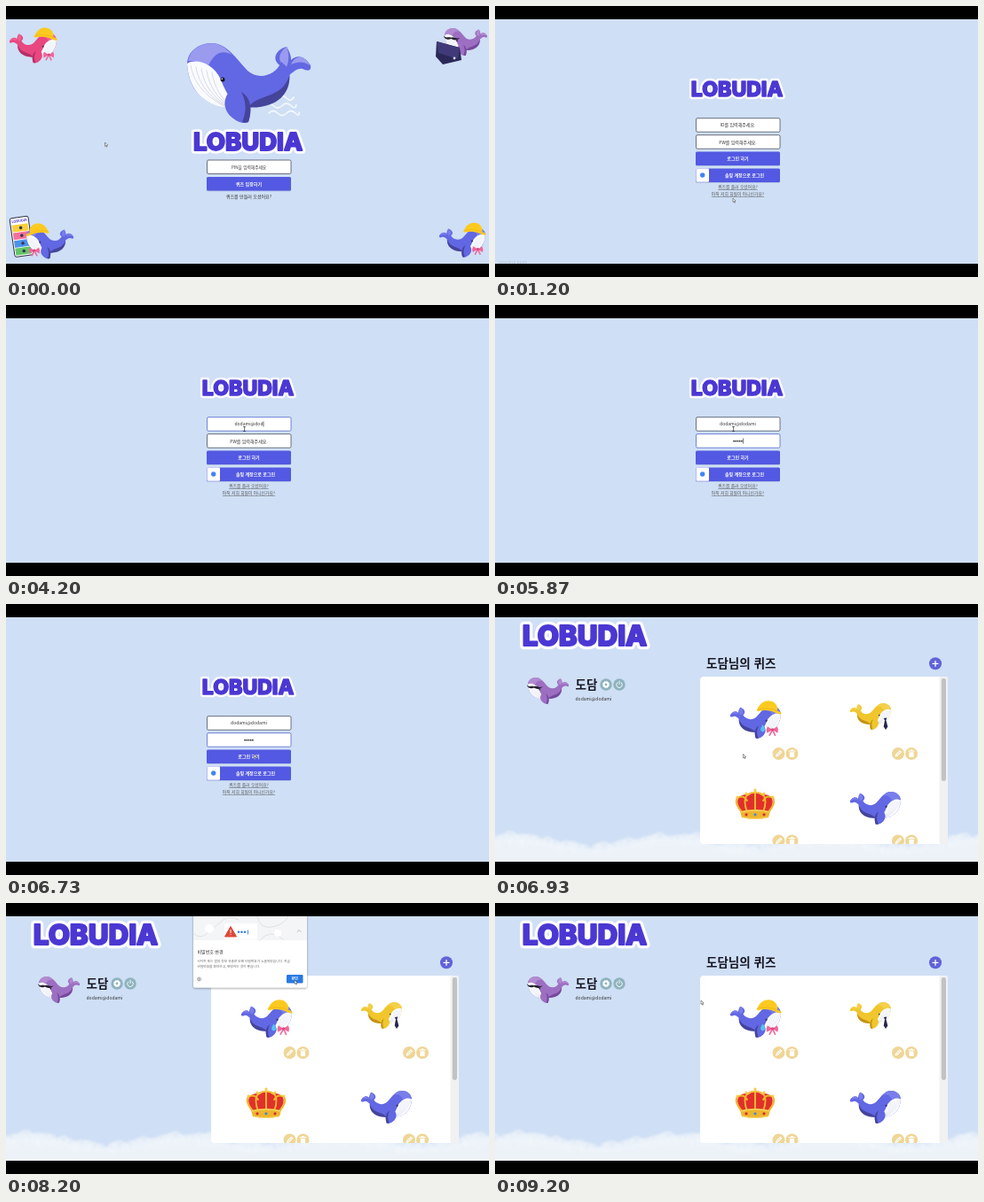
An HTML page that plays this animation: 544 by 306 pixels, repeating every 9270 ms.

```html
<!DOCTYPE html>
<html lang="ko">
<head>
<meta charset="utf-8">
<style>
html, body { margin: 0; width: 100%; height: 100%; overflow: hidden; background: #000; }
svg { display: block; width: 100vw; height: 100vh; }
text { font-family: "Noto Sans CJK KR", "Noto Sans CJK", sans-serif; font-size: 5px; fill: #333; }
.mid { text-anchor: middle; }
.logo { font: 800 27.5px Inter, sans-serif; text-anchor: middle; stroke-linejoin: round; }
.white { fill: #fff; font-weight: 900; }
.head { font-size: 13.5px; font-weight: 900; fill: #161622; }
.link { fill: #555; text-decoration: underline; }
</style>
</head>
<body>
<svg id="stage" viewBox="0 0 544 306"></svg>
<script>
const LOOP = 9270;
const NAME = '도담', ACCOUNT = 'dodami@dodami';
// Body, underside, highlight
const LARGE = ['#6267e3', '#44449b', '#9a9bef'];
const BLUE = ['#6267e3', '#44449b', '#7a7eea'];
const PINK = ['#e8477f', '#b62f68', '#ee628f'];
const PURPLE = ['#9d6fc2', '#75489c', '#b18bd0'];
const YELLOW = ['#f0c62c', '#c59316', '#f4d04c'];

const text = (x, y, s, cls = 'mid', more = '') => `<text x="${x}" y="${y}" class="${cls}" ${more}>${s}</text>`;
const rect = (x, y, w, h, fill, more = '') => `<rect x="${x}" y="${y}" width="${w}" height="${h}" fill="${fill}" ${more}/>`;
const circle = (x, y, r, fill, more = '') => `<circle cx="${x}" cy="${y}" r="${r}" fill="${fill}" ${more}/>`;
const path = (d, fill, more = '') => `<path d="${d}" fill="${fill}" ${more}/>`;
const line = (d, color, width = 1) => path(d, 'none', `stroke="${color}" stroke-width="${width}" stroke-linecap="round" stroke-linejoin="round"`);
const group = (s, more) => `<g ${more}>${s}</g>`;

const logo = (x, y, k) => group(
  [['#fff', 7.5], ['#4b38d3', 1.8]].map(([c, w]) => `<text class="logo" y="10" stroke="${c}" stroke-width="${w}" style="fill:${c}">LOBUDIA</text>`).join(''),
  `transform="translate(${x} ${y}) scale(${k})"`);

const field = (id, y) => rect(226.5, y, 94.5, 15.5, '#fff', `id="${id}" rx="1.5" stroke="#343a48" stroke-width=".7"`);
const button = (y, label, x = 273.5) => rect(226, y + .6, 95, 15.6, '#8d9bd0', 'rx="1.5" opacity=".6"') +
  rect(226, y, 95, 15.4, '#5359e2', 'rx="1.5"') + text(x, y + 9.6, label, 'mid white');

// Accessories share the whale's own 139 x 91 space, facing left.
const HAT = path('M10 14C4-16 50-28 64 8Q70 14 62 15Q36 8 12 20Q0 26-2 21Q1 15 10 14Z', '#fcca1f') +
  line('M10 14Q34 3 63 9', '#eeb51a', 2);
const BOW = path('M23 66L10 57Q5 66 9 75ZL37 57Q42 66 38 75Z', '#f0669a') + circle(23, 66, 4.5, '#d8487f') +
  line('M21 70L16 81M25 70L31 81', '#f0669a', 4);
const TEAR = path('M50 52Q38 68 49 72Q62 70 50 52', '#54c4ef');
const TASHE = path('M-3 24C3 35 13 27 21 31C29 25 38 38 50 31C42 42 29 40 21 35C12 40-2 36-3 24', '#24202c');
const TIE = path('M14 50L25 51L21 58L25 80L18 91L11 80L17 58Z', '#26274f');

function whale(x, y, w, [body, dark, light], flip, extra = '') {
  const k = w / 139;
  const ribs = [0, 1, 2, 3, 4].map(i =>
    line(`M${4 + i * 6} ${25 + i * 2}C${7 + i * 6} ${44 + i * 2} ${20 + i * 5} ${60 + i} ${42 + i * 2} 71`, '#d3d6e0', .9)).join('');
  const shape =
    path('M106 26C95 20 98 8 112 4C117 12 119 20 115 30Z', body) +
    path('M108 25C101 18 104 10 112 4C115 12 115 19 112 27Z', light) +
    path('M112 29C116 13 130 10 139 25C140 31 137 32 130 29C123 28 120 33 115 36Z', body) +
    path('M117 24C122 13 132 13 138 25C131 20 124 21 117 24Z', light) +
    path('M0 23C1 8 14 0 28 0C44 0 54 16 68 31C80 42 100 37 106 21L115 29C119 52 104 68 74 72C36 78 2 66 0 23Z', body) +
    path('M70 71C82 57 107 62 115 37C117 56 101 74 70 72.5Z', dark) +
    path('M1 20C4 5 18-1 30 .3C40 2 46 8 50 13C41 8 32 9 24 25C16 21 8 20 1 20Z', light) +
    path('M0 23C10 17 29 22 38 41C43 55 50 66 60 73C31 76 2 62 0 23Z', '#fafbff') + ribs +
    path('M47 55C39 66 42 78 52 85C58 90 65 91 69 89C73 77 73 62 61 55Z', body) +
    path('M61 55C73 62 73 77 69 89C66 90 64 90 62 89C67 78 67 66 61 55Z', dark) +
    circle(40, 41, 2.5, '#16162c') + circle(39.3, 40.2, .8, '#fff');
  return group(shape + extra, `transform="translate(${flip ? x + w : x} ${y}) scale(${flip ? -k : k} ${k})"`);
}

const bob = s => group(s, 'class="bob"');

function home() {
  const phone = rect(0, 0, 21, 44, '#fff', 'rx="2" stroke="#25253b" stroke-width=".9"') +
    text(10.5, 5.5, 'LOBUDIA', 'mid', 'style="font-size:4px;font-weight:900;fill:#4b38d3"') +
    ['#f8cf3e', '#f2719b', '#4d91ec', '#64c568'].map((c, i) =>
      rect(1.5, 8 + i * 8.8, 18, 8, c) + circle(11, 12 + i * 8.8, 1.8, '#333a52')).join('');
  const laptop = path('M485 40L511 47L513 61L492 66L484 57Z', '#2b2857') +
    path('M485 40L511 47L509 60L487 53Z', '#403b78') + circle(505, 59, 1.4, '#d9d9ef');
  const waves = [0, 1, 2].map(i => line(`M${286 + i * 5} ${104 + i * 8.5}q5-5 10 0t10 0t10 0t${8 - i * 2}-1`, '#f4f8ff', 1.7)).join('');
  return bob(waves + whale(204, 42, 139, LARGE)) +
    bob(whale(4, 30, 53, PINK, true, HAT + BOW)) +
    bob(whale(494, 25, 48, PURPLE, false, TASHE) + laptop) +
    bob(group(phone, 'transform="translate(4 240) rotate(-8)"') + whale(23, 251, 53, BLUE, false, HAT + BOW)) +
    bob(whale(488, 250, 52, BLUE, true, HAT + BOW)) +
    logo(272.5, 153, 1) + field('pin', 174) + text(273.5, 183.7, 'PIN을 입력해주세요', 'mid', 'style="font-size:4.7px"') +
    button(193, '퀴즈 입장하기') + text(273.5, 216.5, '퀴즈를 만들러 오셨어요?');
}

function login() {
  return logo(272.5, 94, .84) + field('idBox', 126.7) + field('pwBox', 145.7) +
    text(273.5, 136.4, '', 'mid', 'id="idText"') + text(273.5, 155.6, '', 'mid', 'id="pwText"') +
    '<g id="dots"></g>' + rect(0, 0, .6, 6, '#222', 'id="caret"') +
    button(164.6, '로그인 하기') + button(183.5, '솔빛 계정으로 로그인', 281) +
    rect(226.4, 183.6, 14.6, 15.2, '#fff', 'rx="1"') + circle(233.7, 191, 2.7, '#4285f4') +
    text(273.5, 206, '퀴즈를 풀러 오셨어요?', 'mid link', 'style="font-size:4.8px"') +
    text(273.5, 214, '아직 저희 회원이 아니신가요?', 'mid link', 'style="font-size:4.8px"') +
    text(4, 291, 'opening page', '', 'id="status"');
}

function clouds() {
  let seed = 7, puffs = '';
  const rnd = () => (seed = seed * 16807 % 2147483647) / 2147483647;
  for (let x = -60; x < 570; x += 7) {
    const y = 269 - 6 * Math.cos((x - 20) / 87.5 * Math.PI);
    puffs += circle(x, y + rnd() * 6, 5 + rnd() * 6, '#f3f7fc', 'opacity=".5"') +
      circle(x + 3, y + 13, 11, '#edf2f8', 'opacity=".7"');
  }
  return group(puffs + rect(-60, 283, 640, 10, '#edf2f8'), 'id="clouds" filter="url(#soft)"');
}

function tools(x, y) {
  return circle(x, y, 7, '#efd697') + line(`M${x - 2.8} ${y + 2.8}l.7-2l4-4l1.4 1.4l-4 4Z`, '#fff', 1.2) +
    circle(x + 15, y, 7, '#efd697') + rect(x + 12.4, y - 1.8, 5.2, 5.8, '#fff', 'rx=".6"') +
    line(`M${x + 11.6} ${y - 3}h6.8m-4.4-1h2`, '#fff', 1.1);
}

function crown() {
  return path('M277 235C270 222 273 216 283 215Q293 209 303 215C313 216 316 222 309 235Z', '#e12f2c') +
    line('M278 235Q269 224 273 219Q280 215 284 222M284 235Q279 222 284 215M293 235V212M302 235Q307 222 302 215M308 235Q317 224 313 219Q306 215 302 222', '#efb62d', 2) +
    line('M284 216Q293 209 302 216', '#f6c844', 1.8) +
    path('M276 234Q293 230 310 234L308 241Q293 245 278 241Z', '#eeb52d') +
    line('M277 235Q293 231 309 235M279 241Q293 244 307 241', '#f9dc75', 1) +
    [283, 293, 303].map((x, i) => circle(x, 237.8, 1.6, i === 1 ? '#4a87d8' : '#d32d38')).join('') +
    [273, 283, 293, 303, 313].map(x => circle(x, 210 + Math.abs(x - 293) * .4, 1.6, '#f7cd4c')).join('');
}

function dialog() {
  return rect(211, 10, 128, 85.5, '#fff', 'rx="2" filter="url(#shade)"') + rect(211, 14, 128, 28, '#f4f5f7') +
    line('M211 34Q218 42 227 34T240 23Q250 12 262 19M283 15Q286 30 300 27T318 15M286 42Q298 28 312 41', '#dcdfe3', .9) +
    circle(229, 29, 5, '#fff') + circle(306, 34, 4, '#fff') +
    rect(246, 23, 37, 18.5, '#fff', 'rx="2"') +
    path('M253 26.5L259.5 38H246.5Z', '#df4738', 'stroke="#df4738" stroke-linejoin="round"') +
    rect(252.5, 30, 1, 4, '#fff') + rect(252.5, 35.2, 1, 1, '#fff') +
    [262, 265.5, 269].map(x => circle(x, 32.8, 1.3, '#397fe2')).join('') + rect(272, 30.5, .9, 5, '#397fe2') +
    line('M328 32.5l2-2l2 2', '#9aa0a6', .7) +
    text(215.5, 57, '비밀번호 변경', '', 'style="font-size:5px"') +
    text(215.5, 66.5, '사이트 또는 앱의 정보 유출로 인해 비밀번호가 노출되었습니다. 지금', '', 'style="font-size:3.7px;fill:#666"') +
    text(215.5, 73, '비밀번호를 확인하고, 변경하는 것이 좋습니다.', '', 'style="font-size:3.7px;fill:#666"') +
    circle(217.5, 86, 1.9, 'none', 'stroke="#555" stroke-width=".6"') + rect(217.2, 85, .6, 2, '#555') +
    rect(316, 81, 18.5, 9.5, '#2878e5', 'rx="1.3"') + text(325.2, 87.4, '확인', 'mid white', 'style="font-size:4px"');
}

function board() {
  const cards = whale(265, 115, 57, BLUE, true, HAT + TEAR + BOW) + whale(400, 112, 46, YELLOW, true, TIE) +
    crown() + whale(400, 212, 57, BLUE, true) +
    tools(319.5, 169) + tools(454, 169) + tools(319.5, 267.5) + tools(454, 267.5);
  return clouds() + logo(101, 35.5, 1.14) + whale(37, 83, 46, PURPLE, false, TASHE) +
    text(90.5, 96, NAME, 'head') + text(90.5, 108.7, ACCOUNT, '', 'style="font-size:5px"') +
    circle(125, 91, 6.7, '#8eb3bd') + circle(125, 91, 2.4, 'none', 'stroke="#fff" stroke-width="2"') +
    circle(125, 91, 3.6, 'none', 'stroke="#fff" stroke-width="1" stroke-dasharray="1.4 1.43"') +
    circle(140, 91, 6.7, '#8eb3bd') + line('M137.7 88.8A3.3 3.3 0 1 0 142.3 88.8M140 87v3.5', '#fff', .9) +
    text(238, 71.5, NAME + '님의 퀴즈', 'head', 'style="font-weight:700"') +
    circle(496, 67.3, 7, '#6163d8') + line('M493 67.3h6m-3-3v6', '#fff', 1.3) +
    rect(231, 82, 279, 189, '#fff', 'rx="4"') + rect(500.5, 82, 9.5, 189, '#f1f1f2', 'rx="2"') +
    rect(502.8, 84, 5.2, 116, '#c2c2c4', 'rx="2.4"') +
    group(cards, 'clip-path="url(#panel)"') + group(dialog(), 'id="dialog"');
}

const stage = document.getElementById('stage');
stage.innerHTML = `<defs>
  <clipPath id="panel"><rect x="231" y="82" width="270" height="189"/></clipPath>
  <filter id="soft"><feGaussianBlur stdDeviation="1.1"/></filter>
  <filter id="shade" x="-10%" y="-10%" width="120%" height="125%"><feDropShadow dx="0" dy="1" stdDeviation="1.3" flood-opacity=".4"/></filter>
</defs>` + rect(0, 0, 544, 306, '#cfdff5') +
  group(home(), 'id="home"') + group(login(), 'id="login"') + group(board(), 'id="board"') +
  group(path('M0 0v4.4l1-.9l.8 1.7l.7-.3l-.8-1.7l1.4-.1Z', '#fff', 'stroke="#333" stroke-width=".5"'), 'id="arrow"') +
  group(line('M-1.2-2.5h2.4M0-2.5v5M-1.2 2.5h2.4', '#222', .6), 'id="beam"') +
  rect(0, 0, 544, 15, '#000') + rect(0, 291, 544, 15, '#000');

const el = id => document.getElementById(id);
const show = (id, on) => el(id).setAttribute('display', on ? 'inline' : 'none');
const bobs = [...document.querySelectorAll('.bob')];

const ID_KEYS = [2530, 2670, 2800, 3000, 3200, 3400, 3600, 3870, 4000, 4130, 4270, 4330, 4530];
const PW_KEYS = [5000, 5130, 5330, 5530, 5670];
const typed = (keys, t) => keys.filter(k => k <= t).length;

// Pointer stops: time, x, y
const STOPS = [[0, 111.5, 154], [130, 111.5, 154], [870, 268, 217], [1270, 268, 217], [1800, 268.5, 140],
  [6130, 268.5, 140], [6530, 279.5, 169.5], [6930, 279.5, 169.5], [7470, 325, 87], [8630, 325, 87], [9130, 232, 110], [LOOP, 232, 110]];

function pointer(t) {
  const i = STOPS.findIndex(s => s[0] > t);
  const [a, x, y] = STOPS[i - 1], [b, u, v] = STOPS[i];
  const p = (t - a) / (b - a), e = p * p * (3 - 2 * p);
  return [x + (u - x) * e, y + (v - y) * e];
}

function drawLogin(t) {
  const onId = t >= 1930 && t < 4730, onPw = t >= 4730;
  const idLen = typed(ID_KEYS, t), pwLen = typed(PW_KEYS, t);
  el('idBox').setAttribute('stroke', onId ? '#3f55c8' : '#343a48');
  el('pwBox').setAttribute('stroke', onPw ? '#3f55c8' : '#343a48');
  el('idText').textContent = t < 1930 ? 'ID를 입력해주세요.' : ACCOUNT.slice(0, idLen);
  el('idText').style.fontWeight = idLen ? 500 : 400;
  el('pwText').textContent = onPw ? '' : 'PW를 입력해주세요.';
  let dots = '';
  for (let i = 0; i < pwLen; i++) dots += circle(273.5 + (i - (pwLen - 1) / 2) * 2.2, 153.7, .85, '#222');
  el('dots').innerHTML = dots;
  const width = onPw ? pwLen * 2.2 : idLen ? el('idText').getComputedTextLength() : 0;
  const since = t - Math.max(onPw ? 4730 : 1930, ...[...ID_KEYS, ...PW_KEYS].filter(k => k <= t));
  el('caret').setAttribute('x', 273.7 + width / 2);
  el('caret').setAttribute('y', onPw ? 150.5 : 131.5);
  show('caret', (onId || onPw) && since % 940 < 470 && t < 6670);
  el('status').setAttribute('opacity', Math.max(0, .3 - (t - 1000) / 1600));
}

function draw(now) {
  const t = now % LOOP;
  const page = t < 1000 ? 'home' : t < 6870 ? 'login' : 'board';
  ['home', 'login', 'board'].forEach(p => show(p, p === page));
  if (page === 'home') bobs.forEach(b => b.setAttribute('transform', `translate(0 ${.8 * Math.sin(t / 320)})`));
  if (page === 'login') drawLogin(t);
  if (page === 'board') {
    el('clouds').setAttribute('transform', `translate(${(t - 6870) * .004} 0)`);
    show('dialog', t >= 7270 && t < 8670);
    el('dialog').setAttribute('opacity', Math.min(1, (t - 7270) / 150));
  }
  const [x, y] = pointer(t);
  const beam = page === 'login' && y > 126 && y < 161;
  show('arrow', !beam);
  show('beam', beam);
  el(beam ? 'beam' : 'arrow').setAttribute('transform', `translate(${x} ${y})`);
}

const start = performance.now();
(function tick() {
  draw(performance.now() - start);
  requestAnimationFrame(tick);
})();
</script>
</body>
</html>
```
